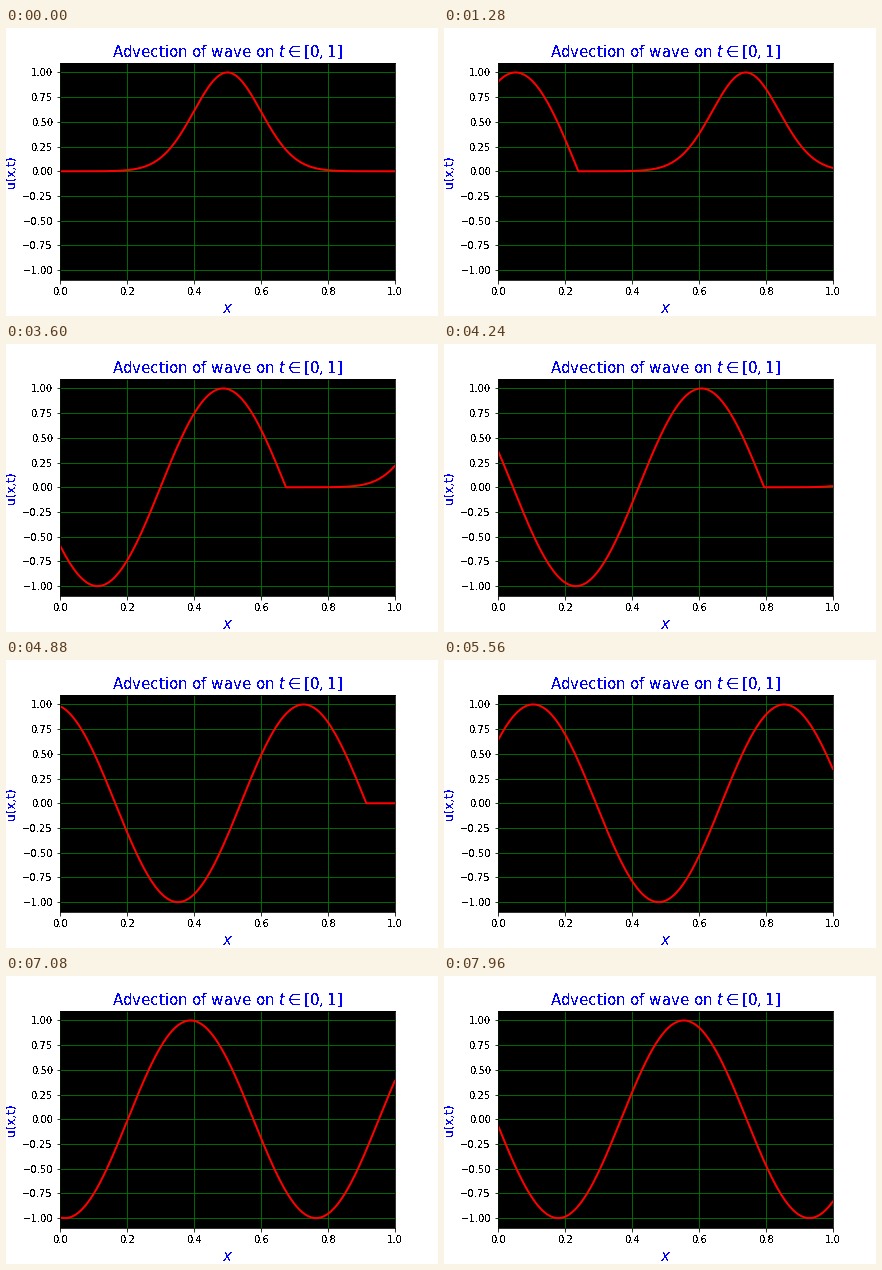
Write a matplotlib script that moves like this. It is 432 by 288 pixels and loops after 8000 ms.

```python
import numpy as np
import matplotlib.pyplot as plt
from matplotlib.animation import FuncAnimation

FRAMES = 200
SPEED = 1.5

x = np.linspace(0, 1, 1001)


def wave(t):
    """Gaussian pulse carried to the right, fed by a sine at the left edge."""
    shift = x - SPEED * t
    pulse = np.exp(-0.5 * ((shift - 0.5) / 0.1) ** 2)
    inflow = np.sin(4 * np.pi * (t - x / SPEED))
    return np.where(shift < 0, inflow, pulse)


def hard_edges(img, dpi):
    """Make every faintly covered text pixel fully opaque."""
    img = img.copy()
    img[..., 3] = img[..., 3] > 0.4
    return img, 0, 0


plt.rcParams["font.family"] = "DejaVu Sans"
fig, ax = plt.subplots(figsize=(6, 4), dpi=72, facecolor="white")
fig.subplots_adjust(left=0.125, right=0.9, bottom=0.125, top=0.88)

ax.set_facecolor("black")
ax.set(xlim=(0, 1), ylim=(-1.1, 1.1))
ax.set_xticks(np.linspace(0, 1, 6))
ax.set_yticks(np.linspace(-1, 1, 9))
ax.grid(color="g")

labels = [
    ax.set_title(r"Advection of wave on $t \in [0,1]$", fontsize=15, color="b"),
    ax.set_xlabel("$x$", fontsize=15, color="b"),
    ax.set_ylabel("u(x,t)", fontsize=12, color="b"),
]
for text in labels + ax.get_xticklabels() + ax.get_yticklabels():
    text.set_agg_filter(hard_edges)

line, = ax.plot(x, wave(0), color="r", lw=2)


def update(frame):
    line.set_ydata(wave(frame / FRAMES))
    return line,


anim = FuncAnimation(fig, update, frames=FRAMES, interval=40,
                     repeat=True, repeat_delay=0)
plt.show()
```
